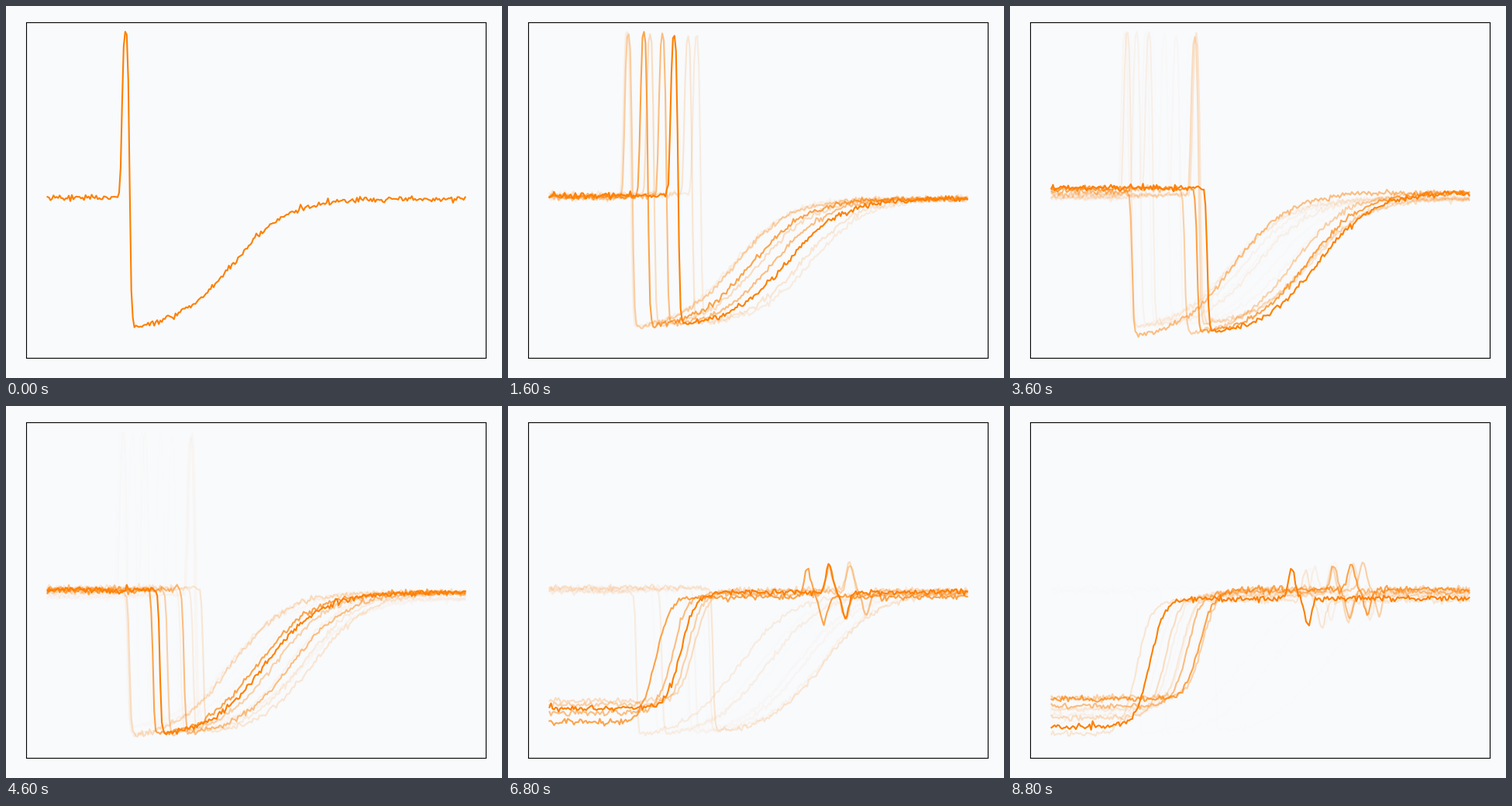
Animation of 640x480 px, one loop 9000 ms. Source, as a matplotlib script:

```python
import matplotlib.pyplot as plt
import numpy as np
from matplotlib.animation import FuncAnimation

W, H, DPI = 640, 480, 100
BACK, ORANGE = "#f8fafc", "#ff7f00"
LEFT, RIGHT, TOP, BOTTOM = 26, 619, 21, 454
FADE = 0.7

# All positions are in stage pixels, y pointing down.
X = np.linspace(53, 592, 275)

# Where the main event of each curve happens; the rest follows from it.
PEAKS = [154, 153, 243, 232, 183, 155, 199, 175, 214, 148, 163, 179, 151, 240, 238]
DROPS = [225, 157, 241, 254, 159, 208, 229, 189, 198, 232, 241, 260, 198, 165, 264]
RISES = [240, 232, 212, 190, 223, 243, 221, 206, 220, 163, 200, 248, 228, 244, 180]
BUMPS = [440, 441, 414, 386, 414, 419, 442, 393, 443, 381, 415, 455, 417, 440, 363]


def step(mid, width):
    """Smooth step from 0 up to 1."""
    return 1 / (1 + np.exp((mid - X) / width))


def bump(mid, width, power=2):
    return np.exp(-np.abs((X - mid) / width) ** power)


def drop(x0, level=240, depth=190):
    """Sudden drop at x0, then a slow recovery."""
    lag = x0 - 160
    fallen = step(x0, 1.1)
    recovery = step(291 + 1.12 * lag, 36)
    base = level - (1 + 0.05 * lag) * (1 - fallen)
    return base + fallen * (depth - 0.07 * lag) * (1 - recovery)


def spike(peak):
    """A tall peak right before a drop."""
    x0 = peak + 6
    height = 217 - 0.12 * (peak - 150)
    return drop(x0, 248, 170) - height * bump(peak, 5.6, 3) * (1 - step(x0, 1.1))


def rise(mid, x0):
    """Step up to a plateau with a wiggle at x0."""
    lead = 240 - mid
    low, high = 380 + 0.55 * lead, 237 + 0.18 * lead
    wiggle = 0.93 * bump(x0 + 21, 6) - bump(x0, 6)
    return low + (high - low) * step(mid, 9.3) + (34 + 0.06 * lead) * wiggle


curves = [*map(spike, PEAKS), *map(drop, DROPS), *map(rise, RISES, BUMPS)]

fig = plt.figure(figsize=(W / DPI, H / DPI), dpi=DPI, facecolor=BACK)
ax = fig.add_axes([LEFT / W, 1 - BOTTOM / H,
                   (RIGHT - LEFT) / W, (BOTTOM - TOP) / H], facecolor=BACK)
# Half a pixel of shift puts whole coordinates on pixel centres.
ax.set(xlim=(LEFT - 0.5, RIGHT - 0.5), ylim=(BOTTOM - 0.5, TOP - 0.5),
       xticks=[], yticks=[])

rng = np.random.default_rng(4)
lines = [ax.plot(X, y + rng.normal(0, 1.9, X.size), color=ORANGE, lw=1.5)[0]
         for y in curves]


def draw(frame):
    for i, line in enumerate(lines):
        line.set_visible(i <= frame)
        line.set_alpha(FADE ** max(frame - i, 0))
    return lines


anim = FuncAnimation(fig, draw, frames=len(lines), interval=200,
                     repeat=True, repeat_delay=0)
plt.show()
```
